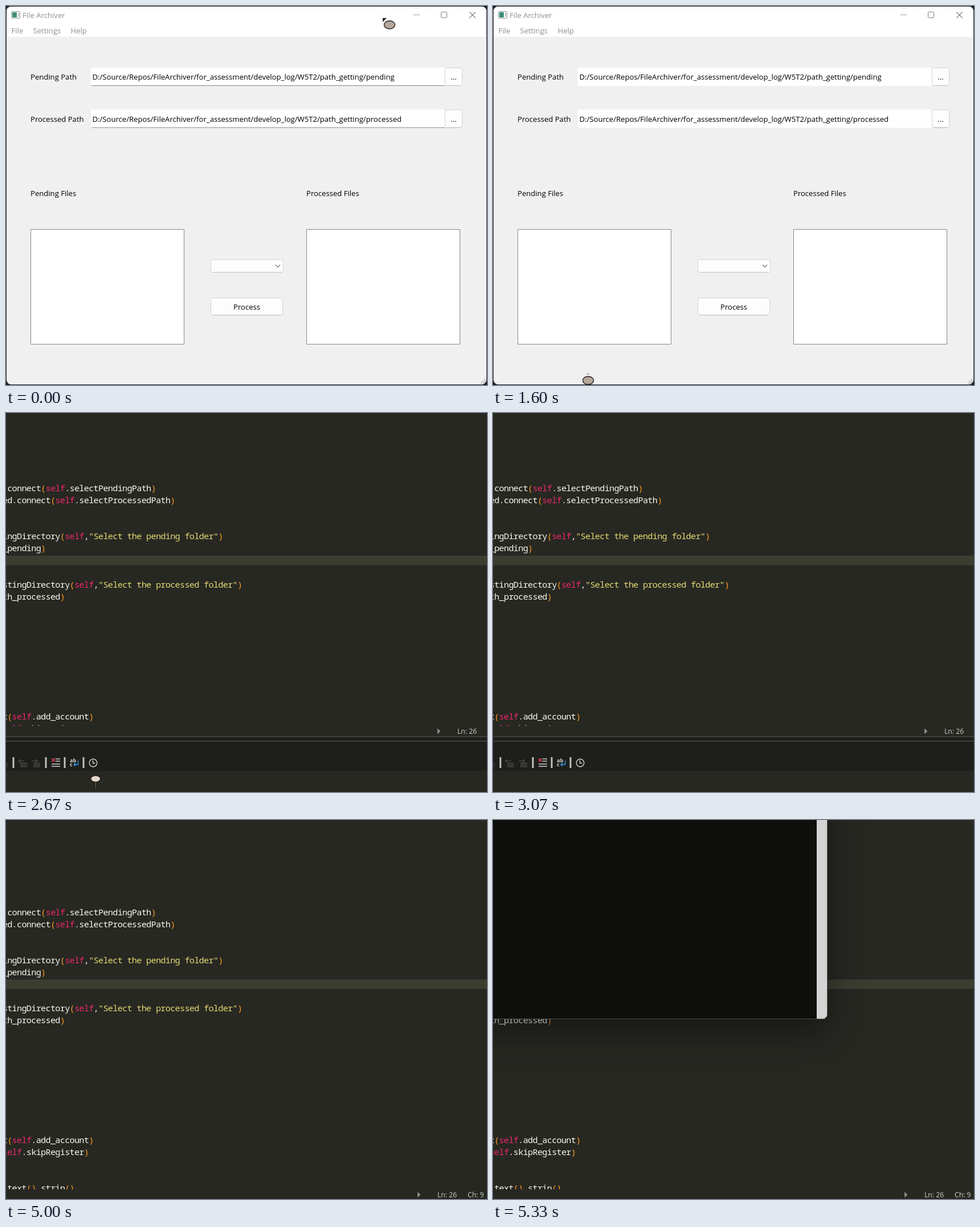
An HTML page with a canvas that plays this animation: 844 by 664 pixels, repeating every 8000 ms.

```html
<!DOCTYPE html>
<html lang="en">
<head>
<meta charset="utf-8">
<title>File Archiver</title>
<style>
html, body { margin: 0; width: 100%; height: 100%; overflow: hidden; background: #272822; }
canvas { display: block; }
</style>
</head>
<body>
<canvas id="stage" width="844" height="664"></canvas>
<script>
const ctx = document.getElementById('stage').getContext('2d');
const W = 844, H = 664, LOOP = 8000, STEP = 1000 / 15;
const UI = '13.1px "Open Sans", "Noto Sans", sans-serif';
const STATUS = '12.2px "Open Sans", "Noto Sans", sans-serif';
const MONO = '15.2px "Noto Sans Mono", "DejaVu Sans Mono", monospace';
const COL = 8.41, ROW = 21.03;

// Times (ms) of the hard changes
const T = { linesOff: 1400, linesOn: 2066, editor: 2666, collapse: 4600, console: 5130 };

function rect(x, y, w, h, color) {
  ctx.fillStyle = color;
  ctx.fillRect(x, y, w, h);
}

function box(x, y, w, h, r, fill, stroke) {
  ctx.beginPath();
  ctx.roundRect(x, y, w, h, r);
  if (fill) { ctx.fillStyle = fill; ctx.fill(); }
  if (stroke) { ctx.strokeStyle = stroke; ctx.lineWidth = 1; ctx.stroke(); }
}

// Each argument after the width is one polyline: [x, y, x, y, ...]
function lines(color, width, ...paths) {
  ctx.strokeStyle = color;
  ctx.lineWidth = width;
  ctx.beginPath();
  for (const p of paths) {
    ctx.moveTo(p[0], p[1]);
    for (let i = 2; i < p.length; i += 2) ctx.lineTo(p[i], p[i + 1]);
  }
  ctx.stroke();
}

function text(s, x, y, color = '#000', font = UI, align = 'left') {
  ctx.font = font;
  ctx.textAlign = align;
  ctx.fillStyle = color;
  ctx.fillText(s, x, y);
}

function clipped(x, y, w, h, draw) {
  ctx.save();
  ctx.beginPath();
  ctx.rect(x, y, w, h);
  ctx.clip();
  draw();
  ctx.restore();
}

// ---- Archiver window ----

function button(x, y, w, h, label) {
  box(x + .5, y + .5, w - 1, h - 1, 3, '#fdfdfd', '#d2d2d2');
  lines('#bfbfbf', 1, [x + 3, y + h - .5, x + w - 3, y + h - .5]);
  text(label, x + w / 2, y + h / 2 + 5, '#000', UI, 'center');
}

function pathRow(y, label, path, underline) {
  text(label, 43, y + 21);
  box(149, y, 622, 32, 2, '#fff');
  if (underline) rect(150, y + 31, 620, 1, '#868686');
  text(path, 151.5, y + 21);
  button(770, y, 31, 32, '...');
}

function fileList(x, label) {
  text(label, x, 333);
  box(x + .5, 391.5, 269, 201, 0, '#fff', '#828790');
}

function archiver(underline) {
  rect(0, 0, W, H, '#1c1c1c');
  box(1, 1, 842, 662, 8, '#f0f0f0');
  box(1, 1, 842, 53, [8, 8, 0, 0], '#fff');

  box(9.5, 9.5, 15, 12, 1, '#fff', '#8c9096');
  rect(11, 11, 8, 9, '#3d8c78');
  rect(21, 12, 2, 7, '#b9bec4');
  text('File Archiver', 29, 20.5, '#8f8f8f');
  lines('#a0a0a0', 1, [715, 15.5, 726, 15.5]);
  box(763.5, 10.5, 10, 10, 1, null, '#808080');
  lines('#808080', 1.1, [813, 10.5, 824, 21], [824, 10.5, 813, 21]);
  text('File', 9.5, 48, '#8f8f8f');
  text('Settings', 47.5, 48, '#8f8f8f');
  text('Help', 113.5, 48, '#8f8f8f');

  const base = 'D:/Source/Repos/FileArchiver/for_assessment/develop_log/W5T2/path_getting/';
  pathRow(108, 'Pending Path', base + 'pending', underline);
  pathRow(181.5, 'Processed Path', base + 'processed', underline);
  fileList(43, 'Pending Files');
  fileList(527, 'Processed Files');

  button(359, 444, 128, 23, '');
  lines('#707070', 1.1, [473, 453.5, 477, 457.5, 481, 453.5]);
  button(359, 511, 127, 31, 'Process');

  for (let i = 0; i < 3; i++)
    for (let j = 0; j <= i; j++) rect(839 - j * 3, 653 + i * 3, 2, 2, '#b4b4b4');
}

// ---- Code editor ----

const CODE = {
  0: '.connect(self.selectPendingPath)',
  1: 'ed.connect(self.selectProcessedPath)',
  4: 'ingDirectory(self,"Select the pending folder")',
  5: '_pending)',
  8: 'stingDirectory(self,"Select the processed folder")',
  9: 'th_processed)',
  19: 't(self.add_account)',
  20: 'self.skipRegister)',
  23: '.text().strip()'
};

function tokenColor(s) {
  if (s[0] === '"') return '#e6db74';
  if (s === 'self') return '#f0266f';
  return s === '(' || s === ')' ? '#fd971f' : '#f8f8f2';
}

function codeLine(s, y) {
  let x = -6.2;
  ctx.font = MONO;
  ctx.letterSpacing = (COL - ctx.measureText('m').width) + 'px';
  for (const part of s.split(/("[^"]*"|\bself\b|[()])/)) {
    text(part, x, y, tokenColor(part), MONO);
    x += part.length * COL;
  }
  ctx.letterSpacing = '0px';
}

function statusBar(x, y) {
  ctx.fillStyle = '#8c8c88';
  ctx.beginPath();
  ctx.moveTo(x - 2, y - 5);
  ctx.lineTo(x + 3.5, y);
  ctx.lineTo(x - 2, y + 5);
  ctx.fill();
  text('Ln: 26', x + 33, y + 4.5, '#d0d0cc', STATUS);
  text('Ch: 9', x + 86, y + 4.5, '#d0d0cc', STATUS);
}

function indentIcon(x, dir) {
  const dim = '#50514c', tip = x - 3 + dir * 5;
  lines(dim, 1.2, [x - 8, 609.5, x + 2, 609.5], [tip - dir * 3, 606.5, tip, 609.5, tip - dir * 3, 612.5]);
  for (let y = 613.5; y < 621; y += 3) lines(dim, 1.4, [x - 5, y, x + 7, y]);
}

function outputPanel() {
  rect(0, 567, W, 60, '#1e1f1c');
  rect(0, 566.5, W, 1.5, '#484945');
  rect(0, 574, W, 1.5, '#484945');
  for (const x of [13, 70, 103, 136]) rect(x - 1.5, 603, 3, 19, '#c0c0bd');
  lines('#50514c', 1.2, [0, 615, 4, 615], [0, 619, 4, 619]);
  indentIcon(30, -1);
  indentIcon(53, 1);

  lines('#d0d0cc', 1.4, [87, 606, 95, 606], [87, 610, 95, 610], [80, 615, 95, 615], [80, 619, 95, 619]);
  lines('#f0455a', 1.5, [80, 605, 86, 611], [86, 605, 80, 611]);

  const small = 'bold 9px "Noto Sans", sans-serif';
  text('ab', 112, 612, '#d8d8d4', small);
  text('c', 112, 619, '#d8d8d4', small);
  lines('#3c9be8', 1.4, [126.5, 609, 126.5, 616, 119, 616], [122, 613, 119, 616, 122, 619]);

  ctx.beginPath();
  ctx.arc(153, 613, 6.8, 0, Math.PI * 2);
  ctx.strokeStyle = '#d0d0cc';
  ctx.lineWidth = 1.4;
  ctx.stroke();
  lines('#d0d0cc', 1.4, [152.5, 608.5, 152.5, 613.5, 156.5, 613.5]);
}

function editor(collapsed) {
  const dy = collapsed ? 29.5 : 0;
  rect(0, 0, W, H, '#272822');
  clipped(0, 0, W, collapsed ? 647 : 548, () => {
    rect(0, 250 + dy, W, 16.5, '#3c3d31');
    for (const row in CODE) codeLine(CODE[row], 137.3 + dy + row * ROW);
  });
  if (collapsed) statusBar(724, 656.5);
  else {
    outputPanel();
    statusBar(759, 557.5);
  }
}

function consoleWindow(alpha) {
  ctx.save();
  ctx.shadowColor = 'rgba(0,0,0,.42)';
  ctx.shadowBlur = 62;
  ctx.shadowOffsetY = 24;
  box(-60, -60, 647, 409, 8, '#272822');
  ctx.restore();

  ctx.save();
  ctx.globalAlpha = alpha;
  box(-60, -60, 647, 409, 8, '#0c0c0c');
  box(568, -60, 18.5, 408.5, [0, 0, 8, 0], '#f0f0f0');
  box(-60, -60, 646.5, 408.5, 8, null, '#55565a');
  ctx.restore();
}

// ---- Pointer ----

// [time, x, y] for the centre of the pointer's head
const PATHS = [
  { kind: 'arrow', keys: [[0, 673, 33], [1133, 673, 33], [1333, 520, 190], [1466, 290, 475], [1560, 185, 625]] },
  { kind: 'resize', keys: [[1560, 185, 625], [1600, 167, 656], [1800, 137, 655], [2066, 143, 668]] },
  { kind: 'arrow', keys: [[2530, 168, 630], [2600, 170, 574], [2666, 160, 620]] },
  { kind: 'beam', keys: [[2666, 157, 642], [2800, 205, 420], [2933, 270, 150], [3070, 300, -30]] },
  { kind: 'busy', keys: [[4330, 300, 31], [4600, 318, 70], [4950, 305, -30]] }
];

function pointerAt(t) {
  for (const { kind, keys } of PATHS) {
    if (t < keys[0][0] || t >= keys[keys.length - 1][0]) continue;
    const i = keys.findIndex(k => k[0] > t);
    const [t0, x0, y0] = keys[i - 1], [t1, x1, y1] = keys[i];
    const f = (t - t0) / (t1 - t0);
    return { kind, x: x0 + (x1 - x0) * f, y: y0 + (y1 - y0) * f };
  }
  return null;
}

function drawPointer({ kind, x, y }) {
  if (kind === 'arrow') {
    ctx.fillStyle = '#2a2020';
    ctx.beginPath();
    ctx.moveTo(x - 12, y - 12);
    ctx.lineTo(x - 5, y - 12);
    ctx.lineTo(x - 12, y - 5);
    ctx.fill();
  }
  if (kind === 'resize') lines('#777', 1, [x - 3, y - 10, x - .5, y - 13, x + 2, y - 10]);
  if (kind === 'beam') {
    lines('#0c0c0c', 3, [x, y, x, y + 19]);
    lines('#a08a60', 1, [x, y, x, y + 18]);
  }
  if (kind === 'busy') lines('#111', 1.2, [x + 7, y - 14, x + 10, y - 14, x + 7, y - 10, x + 10, y - 10]);

  const flat = kind === 'beam' || kind === 'busy';
  ctx.beginPath();
  ctx.ellipse(x, y, flat ? 8.5 : 9.5, flat ? 5.5 : 7, 0, 0, Math.PI * 2);
  ctx.fillStyle = flat ? '#e4d9cb' : '#b5a79b';
  ctx.fill();
  ctx.strokeStyle = '#241c1a';
  ctx.lineWidth = 1.4;
  ctx.stroke();
}

function draw(now) {
  const t = Math.floor((now % LOOP + 2) / STEP) * STEP;
  if (t < T.editor - 1) archiver(t < T.linesOff - 1 || t >= T.linesOn - 1);
  else editor(t >= T.collapse - 1);
  if (t >= T.console) consoleWindow(Math.min(1, .55 + (t - T.console) / 420));
  const p = pointerAt(t);
  if (p) drawPointer(p);
}

let start = null;
function tick(now) {
  if (start === null) start = now;
  draw(now - start);
  requestAnimationFrame(tick);
}
draw(0);
requestAnimationFrame(tick);
</script>
</body>
</html>
```
